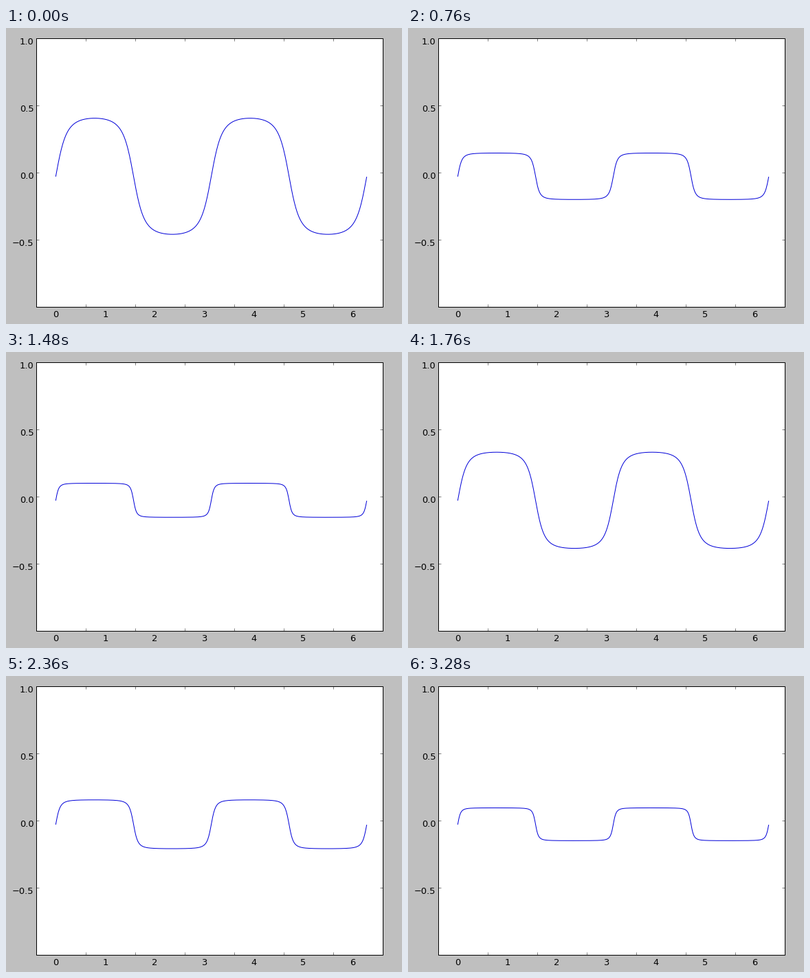
A matplotlib script for the animation above (3320 ms loop, 576x432 px).

```python
import numpy as np
import matplotlib.pyplot as plt
from matplotlib.animation import FuncAnimation
from matplotlib.patches import Rectangle

W, H, DPI = 576, 432, 72
FRAMES, CYCLE, INTERVAL = 83, 42, 40
LEFT, RIGHT, TOP, BOTTOM = 44, 548, 15, 407
X0, Y0 = 72.4, 216.4          # pixel position of the data origin
XUNIT, YUNIT = 72, 196        # pixels per data unit
TICK = 4

plt.rcParams["font.family"] = "DejaVu Sans"
plt.rcParams["font.size"] = 13
fig = plt.figure(figsize=(W / DPI, H / DPI), dpi=DPI, facecolor="#bfbfbf")
ax = fig.add_axes([0, 0, 1, 1])
ax.set_xlim(0, W)
ax.set_ylim(H, 0)
ax.axis("off")


def segment(xs, ys):
    ax.plot(xs, ys, color="black", lw=0.5, solid_capstyle="butt", zorder=3)


ax.add_patch(Rectangle((LEFT, TOP), RIGHT - LEFT, BOTTOM - TOP,
                       facecolor="white", edgecolor="black", lw=1, zorder=1))

for i in range(8):
    x = LEFT + i * XUNIT
    segment([x, x], [TOP, TOP + TICK])
    segment([x, x], [BOTTOM, BOTTOM - TICK])
for i in range(5):
    y = TOP + i * YUNIT / 2
    segment([LEFT, LEFT + TICK], [y, y])
    segment([RIGHT, RIGHT - TICK], [y, y])

for i in range(7):
    ax.text(X0 + i * XUNIT, 421.8, str(i), ha="center", va="baseline")
for i, label in enumerate(["1.0", "0.5", "0.0", "\u22120.5"]):
    ax.text(40.5, 23.8 + i * YUNIT / 2, label, ha="right", va="baseline")

x = np.arange(0, 2 * np.pi, 0.01)
wave = np.sin(2 * x)
curve, = ax.plot([], [], color="#0000d8", lw=1, zorder=4)


def update(frame):
    # cubic damping: the inverse square of the peak grows almost linearly
    n = frame % CYCLE
    u = 5.35 + 1.65 * n - 1.6 * np.log1p(0.35 * n)
    y = wave / np.sqrt(1 + (u - 1) * wave ** 2)
    curve.set_data(X0 + x * XUNIT, Y0 - y * YUNIT)
    return curve,


anim = FuncAnimation(fig, update, frames=FRAMES, interval=INTERVAL,
                     repeat=True, repeat_delay=0)
plt.show()
```
